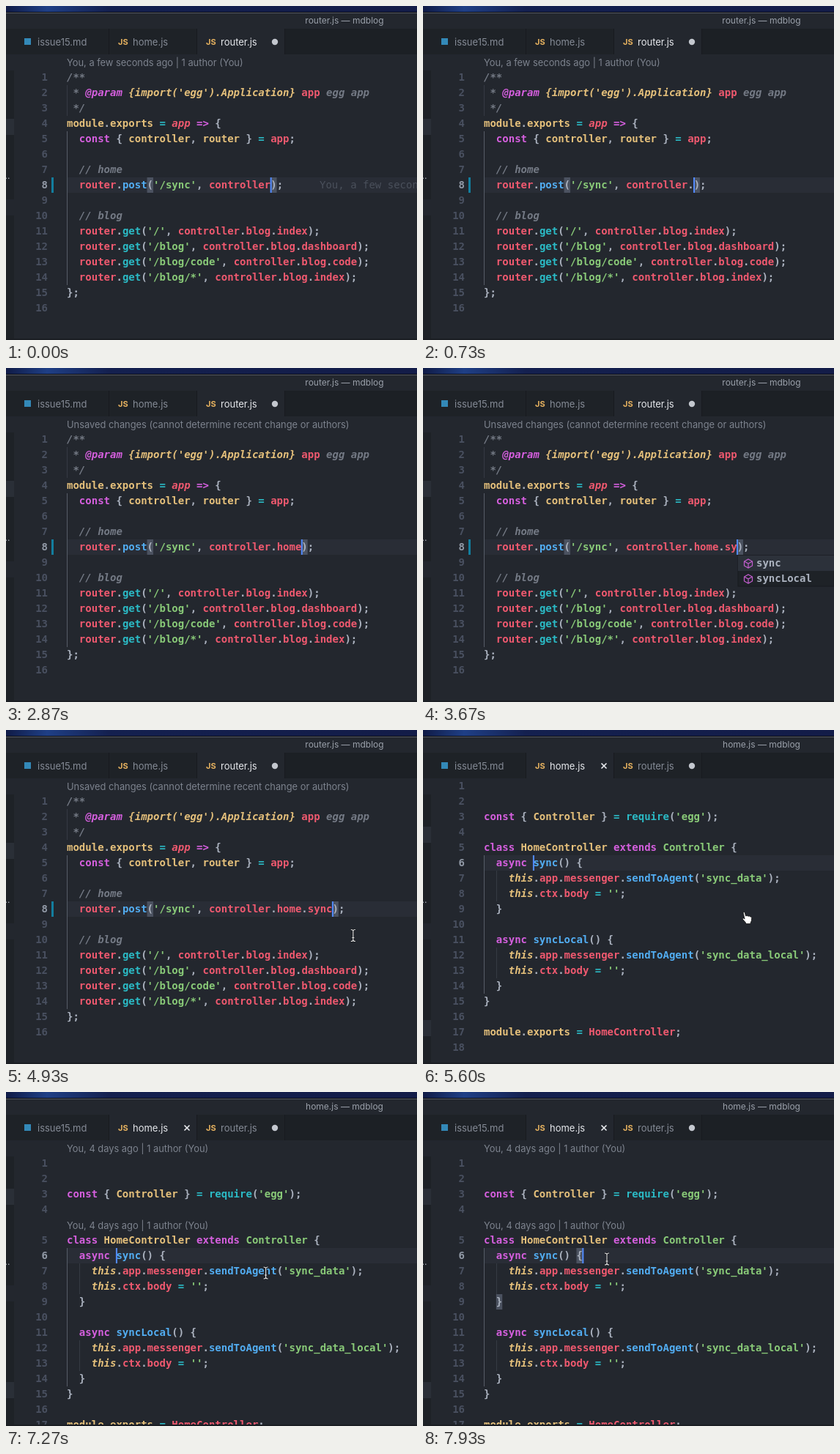
Recreate the animation shown at these times as an HTML page. Size 561 by 456 pixels, loop 8 s.

```html
<!DOCTYPE html>
<html lang="en">
<head>
<meta charset="utf-8">
<title>Editor</title>
<style>
  html, body { margin: 0; width: 100%; height: 100%; overflow: hidden; background: #23272e; }
  svg { display: block; }
  text { white-space: pre; }
  .code { font: bold 14px "DejaVu Sans Mono", monospace; }
  .ui { font-family: Inter, sans-serif; }
</style>
</head>
<body>
<svg id="stage" width="561" height="456" viewBox="0 0 561 456"></svg>
<script>
const LOOP = 8000, LEFT = 83, ROW = 21, CHAR = 8.428;
const OPEN_HOME = 5270, LENS_SHIFT = 6600, CLICK = 7870;
const BG = '#23272e', DARK = '#1e2227', BORDER = '#181a1f';
const COLORS = {
  f: '#abb2bf', r: '#ef596f', p: '#d55fde', b: '#52adf2',
  c: '#2bbac5', g: '#89ca78', y: '#e5c07b', k: '#747a85'
};

// "^x" starts a run in colour x; an upper-case letter makes it italic.
const red = path => '^r' + path.split('.').join('^f.^r');
const route = (path, handler) =>
  `^f  ^rrouter^f.^cget^f(^g'${path}'^f, ${red('controller.blog.' + handler)}^f);`;
const method = (name, message) => [
  `^p  async ^b${name}^f() {`,
  `^Y    this^f.${red('app.messenger')}^f.^bsendToAgent^f(^g'${message}'^f);`,
  `^Y    this^f.${red('ctx.body')} ^c= ^g''^f;`,
  '^f  }'
];

const routerLines = typed => [
  '^K/**',
  "^K * ^P@param ^Y{import('egg').Application} ^rapp ^Kegg app",
  '^K */',
  '^ymodule^f.^yexports ^c= ^Rapp ^p=> ^f{',
  '^p  const ^f{ ^ycontroller^f, ^yrouter ^f} ^c= ^rapp^f;',
  '',
  '^K  // home',
  `^r  router^f.^bpost^f(^g'/sync'^f, ${red(typed)}^f);`,
  '',
  '^K  // blog',
  route('/', 'index'),
  route('/blog', 'dashboard'),
  route('/blog/code', 'code'),
  route('/blog/*', 'index'),
  '^f};',
  ''
];

const homeLines = [
  '', '',
  "^pconst ^f{ ^yController ^f} ^c= ^crequire^f(^g'egg'^f);",
  '',
  '^pclass ^yHomeController ^pextends ^gController ^f{',
  ...method('sync', 'sync_data'),
  '',
  ...method('syncLocal', 'sync_data_local'),
  '^f}',
  '',
  '^ymodule^f.^yexports ^c= ^rHomeController^f;',
  ''
];

const HANDLER = 'controller.home.sync';
const KEY_TIMES = [270, 1200, 1330, 1470, 1600, 3400, 3530, 3670, 4000, 4000];
const MOUSE = [
  [4530, 540, 330], [5130, 441, 256], [5930, 441, 256], [6730, 291, 251],
  [6830, 291, 251], [7600, 402, 244], [7670, 330, 205], [7730, 251, 228]
];

const clamp = v => Math.max(0, Math.min(1, v));
const colX = col => LEFT + col * CHAR;
const rect = (x, y, w, h, fill, extra = '') =>
  `<rect x="${x}" y="${y}" width="${w}" height="${h}" fill="${fill}" ${extra}/>`;
const ui = (x, y, size, fill, text, extra = '') =>
  `<text class="ui" x="${x}" y="${y}" font-size="${size}" fill="${fill}" ${extra}>${text}</text>`;
const mono = (x, y, fill, text, extra = '') =>
  `<text class="code" x="${x}" y="${y}" fill="${fill}" ${extra}>${text}</text>`;

function codeLine(y, source) {
  const runs = source.split('^').slice(1).map(run => {
    const key = run[0], lower = key.toLowerCase();
    const style = key === lower ? '' : ' font-style="italic"';
    return `<tspan fill="${COLORS[lower]}"${style}>${run.slice(1)}</tspan>`;
  });
  return mono(LEFT, y + 15, COLORS.f, runs.join(''));
}

const lens = (y, text, opacity = 1) =>
  ui(LEFT, y + 16, 12.86, '#7d838e', text, `opacity="${opacity}"`);
const bracket = (col, y) => rect(colX(col), y, CHAR, ROW, '#4b5260');
const caret = (col, y, opacity = 1) =>
  rect(colX(col) - .5, y, 2, ROW, '#528bff', `opacity="${opacity}"`);
const guide = (col, y, rows, fill = '#353a43') =>
  rect(Math.round(colX(col)), y, 1, rows * ROW, fill);

function codeArea(lines, rowY, active) {
  return lines.map((source, i) => {
    const y = rowY(i + 1);
    return mono(57, y + 15, i + 1 === active ? '#929aa7' : '#495060', i + 1, 'text-anchor="end"')
      + codeLine(y, source);
  }).join('');
}

function popup(x, y) {
  const item = (label, i) => {
    const top = y + i * ROW;
    return `<path transform="translate(${x + 14} ${top + 11})" d="M0-6 5.5-3V3L0 6-5.5 3V-3ZM-5.5-3 0 0 5.5-3M0 0V6"
      fill="none" stroke="#c45fd0" stroke-width="1.2"/>` + mono(x + 25, top + 15, COLORS.f, label);
  };
  return rect(x, y, 561 - x, 2 * ROW, DARK, `stroke="${BORDER}"`)
    + rect(x, y, 561 - x, ROW, '#2c313a')
    + item('sync', 0) + item('syncLocal', 1);
}

function routerView(t) {
  const rowY = n => 87 + (n - 1) * ROW, y = rowY(8);
  const length = 10 + KEY_TIMES.filter(k => t >= k).length;
  const col = 23 + length;
  const blink = t < 3400 ? 1 - clamp((t - 2870) / 200) : 1;
  return rect(LEFT, y, 478, ROW, '#292d36')
    + rect(62, y, 3, ROW, '#137e9e')
    + guide(0, rowY(2), 2) + guide(0, rowY(5), 10, '#565c67')
    + bracket(13, y) + bracket(col, y)
    + lens(66, t < 2400 ? 'You, a few seconds ago | 1 author (You)'
      : 'Unsaved changes (cannot determine recent change or authors)')
    + codeArea(routerLines(HANDLER.slice(0, length)), rowY, 8)
    + (t < 270 ? mono(428, y + 15, '#4a505b', 'You, a few seconds ago', 'style="font-weight:400"') : '')
    + caret(col, y, blink)
    + (t >= 3530 && t < 4000 ? popup(Math.round(colX(col)) + 1, y + ROW + 1) : '');
}

function homeView(t) {
  const shifted = t >= LENS_SHIFT, clicked = t >= CLICK;
  const rowY = n => 66 + (n - 1) * ROW + (shifted ? ROW * (n < 5 ? 1 : 2) : 0);
  const y = rowY(6), fade = clamp((t - 6700) / 300);
  const author = 'You, 4 days ago | 1 author (You)';
  return rect(LEFT, y, 478, ROW, '#292d36')
    + guide(0, y, 9, '#565c67') + guide(2, rowY(7), 2) + guide(2, rowY(12), 2)
    + (clicked ? bracket(15, y) + bracket(2, rowY(9)) : '')
    + (shifted ? lens(66, author, fade) + lens(171, author, fade) : '')
    + codeArea(homeLines, rowY, 6)
    + caret(clicked ? 16 : 8, y);
}

function chrome(home) {
  const tab = (x, w, on) => rect(x, 31, w, 35, on ? BG : DARK) + rect(x + w, 31, 1, 35, BORDER);
  const label = (x, text, on) => ui(x, 54, 13, on ? '#e6e8ec' : '#858b96', text);
  const js = x => ui(x, 53, 11, '#e5b15f', 'JS', 'font-weight="700"');
  const bands = home ? [132, 396] : [154];
  return '<defs><linearGradient id="desk"><stop stop-color="#101b46"/><stop offset=".1" stop-color="#1f3f86"/>'
    + '<stop offset=".25" stop-color="#14204f"/><stop offset="1" stop-color="#131c48"/></linearGradient></defs>'
    + rect(0, 0, 561, 31, BG) + rect(0, 0, 561, 8, 'url(#desk)')
    + rect(0, 8, 561, 1, '#0b0d14') + rect(0, 9, 561, 1, '#555961')
    + ui(462, 24, 12, '#9aa0aa', (home ? 'home' : 'router') + '.js — mdblog', 'text-anchor="middle"')
    + rect(0, 31, 561, 35, '#1c2025')
    + tab(0, 140, false) + tab(141, 119, home) + tab(261, 119, !home)
    + rect(25, 44, 9, 9, '#3389b8') + label(43, 'issue15.md', false)
    + js(153) + label(173, 'home.js', home)
    + js(273) + label(293, 'router.js', !home)
    + (home ? '<path d="M243.5 45.5l7 7m0-7l-7 7" stroke="#e6e8ec" stroke-width="1.7"/>' : '')
    + '<circle cx="367" cy="49" r="4.2" fill="#c3c7ce"/>'
    + rect(0, 88, 11, 176, DARK) + rect(0, 286, 11, 170, DARK)
    + bands.map(y => rect(0, y, 11, 22, '#2a2f37')).join('')
    + ui(-5, 236, 12, '#b4bac4', '...')
    + rect(0, 454, 561, 2, '#1b1e23');
}

function mouse(t) {
  if (t < MOUSE[0][0]) return '';
  const next = MOUSE.findIndex(k => k[0] > t);
  const b = MOUSE[next < 0 ? MOUSE.length - 1 : next];
  const a = next < 0 ? b : MOUSE[next - 1];
  const p = clamp((t - a[0]) / (b[0] - a[0] || 1));
  const at = `transform="translate(${a[1] + (b[1] - a[1]) * p} ${a[2] + (b[2] - a[2]) * p})"`;
  if (t >= 5130 && t < 5930)
    return `<path ${at} d="M-4-7q1.2-1.2 2.2 0L-.5-2l1.8-.6 1.5.8 1.8-.2 1 1 1.4.1.7 1.5-.4 4-1.2 2.5v1.5h-6l-1-2-4-4.5q0-1.6 1.6-1l1.4 1Z"
      fill="#fff" stroke="#111" stroke-width=".8"/>`;
  const beam = (color, width) => `<path d="M-3-8Q0-8 0-6Q0-8 3-8M0-6V6M-3 8Q0 8 0 6Q0 8 3 8M-1.5 3H1.5"
    fill="none" stroke="${color}" stroke-width="${width}"/>`;
  return `<g ${at}>${beam('#15171b', 2.6)}${beam('#e8e8e8', 1.1)}</g>`;
}

const stage = document.getElementById('stage');
let shown = '';
function draw(now) {
  const t = now % LOOP, home = t >= OPEN_HOME;
  const picture = rect(0, 0, 561, 456, BG) + (home ? homeView(t) : routerView(t)) + chrome(home) + mouse(t);
  if (picture !== shown) stage.innerHTML = shown = picture;
}

const start = performance.now();
function tick() {
  draw(performance.now() - start);
  requestAnimationFrame(tick);
}
tick();
</script>
</body>
</html>
```
